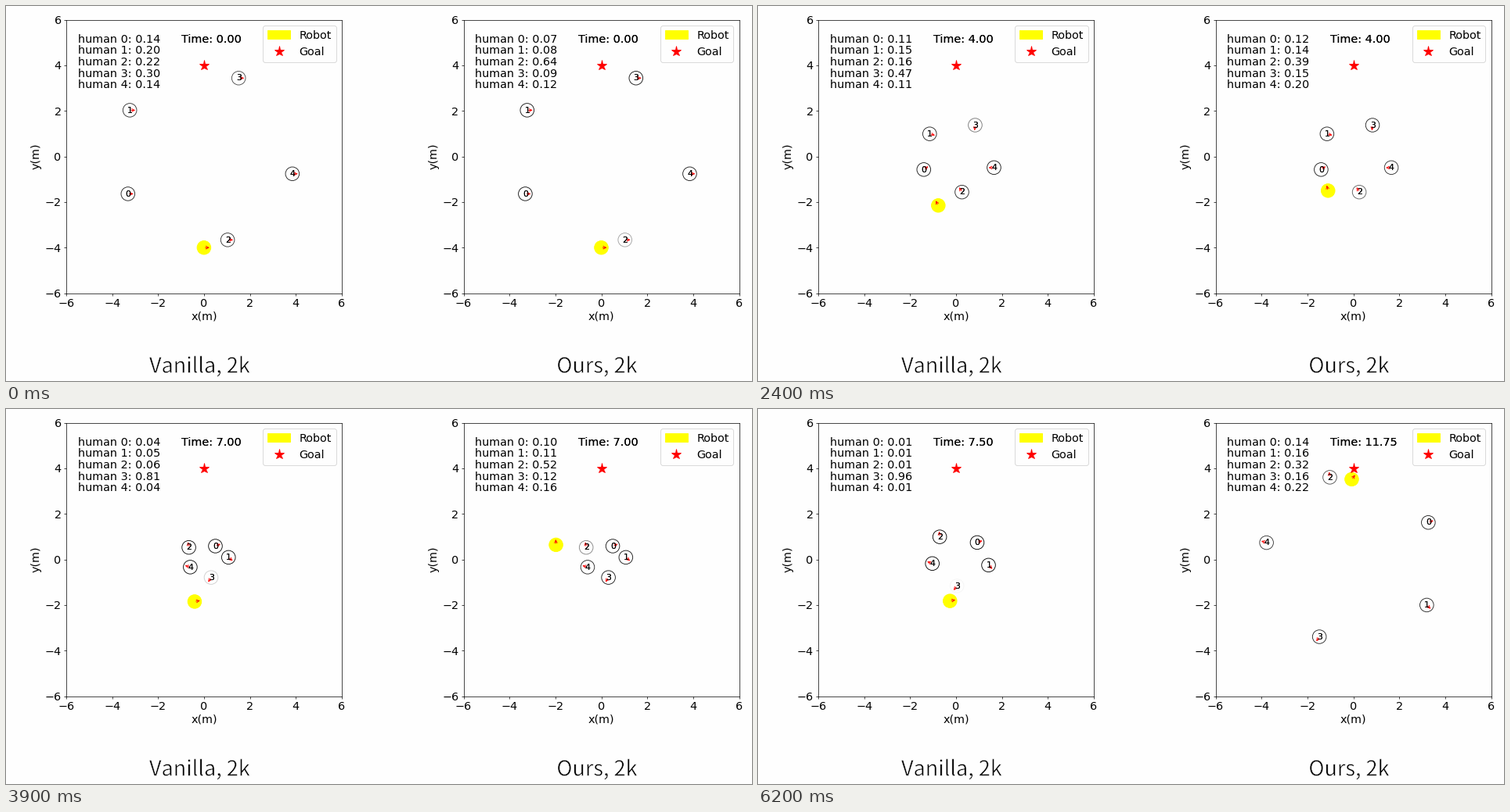
Write a matplotlib script that moves like this. It is 953 by 480 pixels and loops after 6.25 s.

```python
import numpy as np
import matplotlib.pyplot as plt
from matplotlib.animation import FuncAnimation
from matplotlib.lines import Line2D
from matplotlib.patches import ArrowStyle, Circle, FancyArrowPatch
from matplotlib.patheffects import Stroke

W, H, DPI = 953, 480, 64
FRAMES, INTERVAL = 125, 50
STEP_MS, START_MS, LAST = 123.5, 350, 47
MEET = 32  # step from which every human has a free way to the goal
BACK = "#fefefe"
BIG, SMALL = 16.2, 12.2
RADIUS = 0.3
PANEL_GAP = 507.6

plt.rcParams["font.family"] = "DejaVu Sans"


def spline(knots, points):
    """Smooth path through the points, sampled at every whole step."""
    slopes = np.gradient(points, knots, axis=0)
    steps = np.arange(knots[-1] + 1)
    i = np.clip(np.searchsorted(knots, steps, "right") - 1, 0, len(knots) - 2)
    span = (knots[i + 1] - knots[i])[:, None]
    u = (steps - knots[i])[:, None] / span
    return ((2 * u**3 - 3 * u**2 + 1) * points[i]
            + (u**3 - 2 * u**2 + u) * span * slopes[i]
            + (3 * u**2 - 2 * u**3) * points[i + 1]
            + (u**3 - u**2) * span * slopes[i + 1])


def walk(x, y, pace, swing):
    """Speed up across the circle, swing round the crowd, slow near the far side."""
    start = np.array([x, y])
    ahead = -start / np.hypot(x, y)
    left = np.array([-ahead[1], ahead[0]])
    k = np.arange(MEET + 1)[:, None]
    along = pace * (0.129 * k + 4e-5 * k**3)
    side = swing * np.exp(-((k - 25.5) / 9) ** 2)
    path = list(start + along * ahead + side * left)
    while len(path) <= LAST:
        gap = -start - path[-1]
        path.append(path[-1] + 0.25 * gap / max(1, np.hypot(*gap)))
    return np.array(path)


def headings(path):
    """Direction of the latest move; everyone faces right at first."""
    moves = np.diff(path, axis=0)
    return np.concatenate([[0], np.arctan2(moves[:, 1], moves[:, 0])])


# Start x and y, pace, and how far the path swings to the left.
HUMANS = [walk(*spec) for spec in (
    (-3.31, -1.64, 0.98, 0.33),
    (-3.23, 2.03, 1.04, 0.70),
    (1.03, -3.66, 1.00, 0.53),
    (1.51, 3.44, 0.97, 0.65),
    (3.85, -0.76, 0.99, 0.48),
)]
TURNS = [headings(path) for path in HUMANS]

# Robot way points: step, x, y, attention paid to the focus human.
# The other humans divide the remaining attention by their odds.
PANELS = [
    dict(caption="Vanilla, 2k", focus=3, odds=(20, 29, 31, 0, 20),
         route=[(0, 0, -4, 0.30), (9, -0.38, -2.71, 0.47), (16, -0.77, -2.15, 0.47),
                (24, -0.67, -1.91, 0.52), (30, -0.26, -1.82, 0.96)]),
    dict(caption="Ours, 2k", focus=2, odds=(20, 23, 0, 24, 33),
         route=[(0, 0, -4, 0.64), (9, -0.91, -2.85, 0.32), (16, -1.10, -1.50, 0.39),
                (24, -1.86, -0.25, 0.38), (32, -1.86, 1.50, 0.66),
                (39, -0.98, 2.39, 0.74), (47, -0.07, 3.52, 0.32)]),
]


class Panel:
    def __init__(self, fig, shift, caption, focus, odds, route):
        route = np.array(route)
        knots = route[:, 0].astype(int)
        self.last = knots[-1]
        self.path = spline(knots, route[:, 1:3])
        self.facing = headings(self.path)
        share = np.interp(np.arange(self.last + 1), knots, route[:, 3])
        self.scores = np.outer(odds, 1 - share) / sum(odds)
        self.scores[focus] = share

        self.ax = ax = fig.add_axes([(76.9 + shift) / W, 112.4 / H, 352 / W, 350 / H],
                                    facecolor=BACK)
        ax.set(xlim=(-6, 6), ylim=(-6, 6), xticks=range(-6, 7, 2), yticks=range(-6, 7, 2))
        ax.tick_params(labelsize=BIG)
        ax.set_xlabel("x(m)", fontsize=BIG, labelpad=3)
        ax.set_ylabel("y(m)", fontsize=BIG)

        self.robot = ax.add_patch(Circle((0, -4), RADIUS, color="yellow"))
        star = ax.add_line(Line2D([0], [4], color="red", marker="*", ls="None", ms=15))
        ax.legend([self.robot, star], ["Robot", "Goal"], fontsize=BIG, loc="upper right")

        self.rings = [ax.add_patch(Circle((0, 0), RADIUS, fill=False)) for _ in HUMANS]
        self.arrows = [self.arrow() for _ in range(len(HUMANS) + 1)]
        # Digits and clock are drawn twice, which makes them look heavier.
        self.digits = [[ax.text(0, 0, str(i), fontsize=SMALL) for _ in range(2)]
                       for i in range(len(HUMANS))]
        self.clock = [ax.text(-1, 5, "", fontsize=BIG) for _ in range(2)]
        self.labels = [ax.text(-5.5, 5 - 0.5 * i, "", fontsize=BIG)
                       for i in range(len(HUMANS))]

        # A background-coloured outline thins the caption's strokes.
        fig.text((247.5 + shift) / W, 10.6 / H, caption, ha="center", va="baseline",
                 family="Noto Sans CJK JP", fontsize=30.4,
                 path_effects=[Stroke(linewidth=0.7, foreground=BACK)])

    def arrow(self):
        style = ArrowStyle("->", head_length=4, head_width=2)
        return self.ax.add_patch(FancyArrowPatch((0, 0), (1, 0), color="red", arrowstyle=style))

    def show(self, step):
        k = min(step, self.last)
        self.robot.center = self.path[k]
        self.aim(self.arrows[-1], self.path[k], self.facing[k])
        for i, (path, turn) in enumerate(zip(HUMANS, TURNS)):
            x, y = path[k]
            score = self.scores[i, k]
            self.rings[i].center = x, y
            self.rings[i].set_edgecolor(str(score))
            self.aim(self.arrows[i], path[k], turn[k])
            for digit in self.digits[i]:
                digit.set_position((x - 0.11, y - 0.11))
            self.labels[i].set_text(f"human {i}: {score:.2f}")
        for text in self.clock:
            text.set_text(f"Time: {k / 4:.2f}")

    @staticmethod
    def aim(arrow, pos, angle):
        tip = pos + RADIUS * np.array([np.cos(angle), np.sin(angle)])
        arrow.set_positions(tuple(pos), tuple(tip))


fig = plt.figure(figsize=(W / DPI, H / DPI), dpi=DPI, facecolor=BACK)
panels = [Panel(fig, i * PANEL_GAP, **spec) for i, spec in enumerate(PANELS)]


def update(frame):
    step = int(np.clip((frame * INTERVAL - START_MS) // STEP_MS, 0, LAST))
    for panel in panels:
        panel.show(step)


anim = FuncAnimation(fig, update, frames=FRAMES, interval=INTERVAL,
                     repeat=True, repeat_delay=0, blit=False)
plt.show()
```
